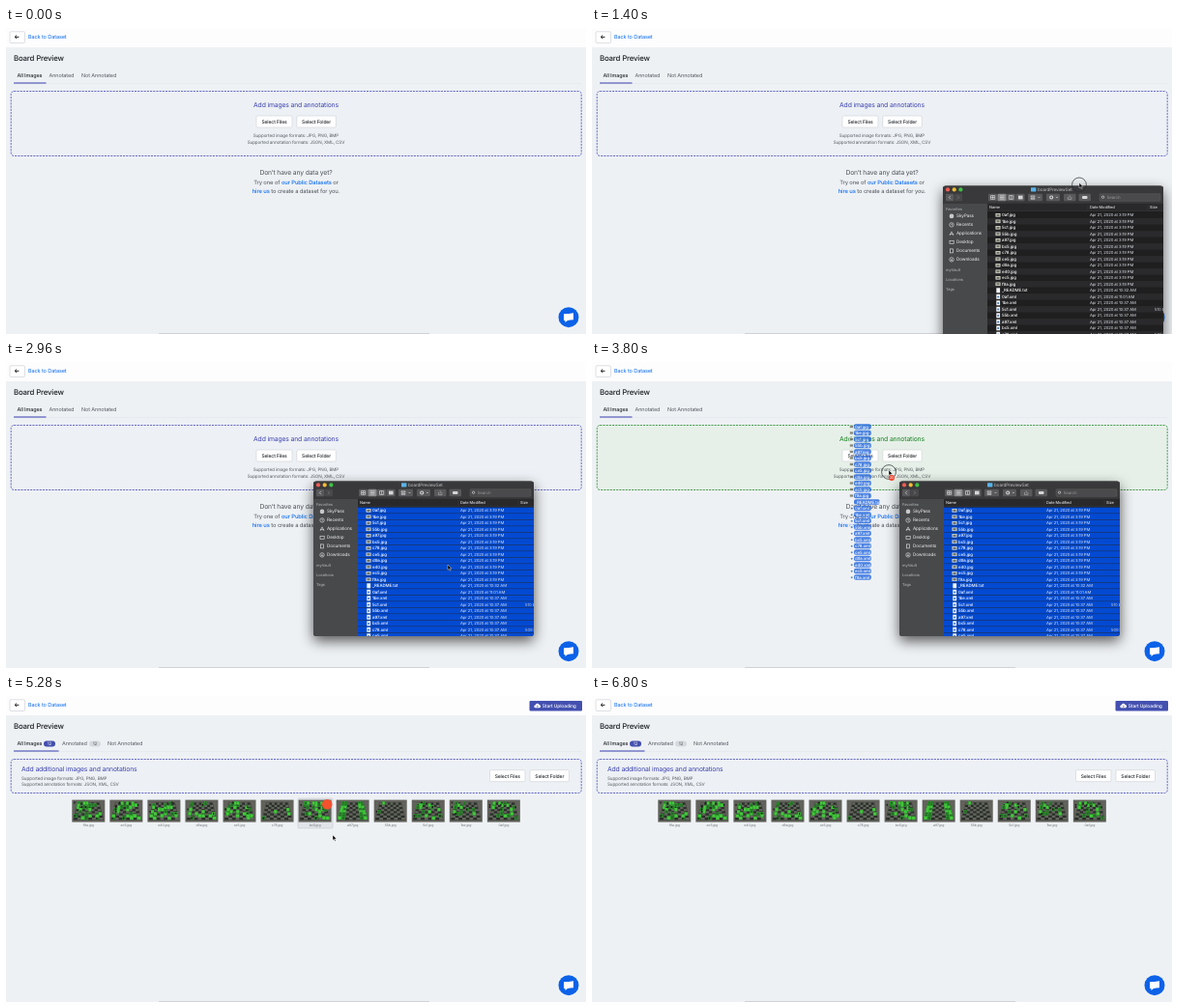
An HTML page that plays this animation: 600 px wide and 317 px high, repeating every 6840 ms.

```html
<!DOCTYPE html>
<html lang="en">
<head>
<meta charset="utf-8">
<title>Dataset upload</title>
<style>
  html, body { margin: 0; width: 100%; height: 100%; overflow: hidden; background: #eef1f4; }
  svg { display: block; width: 100vw; height: 100vh; }
  text { font-family: Inter, "Open Sans", sans-serif; letter-spacing: -.02em; text-rendering: geometricPrecision; white-space: pre; }
  .link { fill: #0b6cf0; font-weight: 500; }
</style>
</head>
<body>
<svg id="stage" viewBox="0 0 600 317"></svg>
<script>
const LOOP = 6840;
const INDIGO = '#3a41b0', GREEN = '#16801f', LINK = '#0b6cf0', GREY = '#555b62';
const stage = document.getElementById('stage');

function el(parent, tag, attrs = {}, content) {
  const node = document.createElementNS('http://www.w3.org/2000/svg', tag);
  for (const key in attrs) node.setAttribute(key, attrs[key]);
  if (content !== undefined) node.textContent = content;
  parent.append(node);
  return node;
}
const group = (parent, attrs) => el(parent, 'g', attrs);
const rect = (parent, x, y, width, height, fill, more) =>
  el(parent, 'rect', { x, y, width, height, fill, ...more });
const circle = (parent, cx, cy, r, fill, more) => el(parent, 'circle', { cx, cy, r, fill, ...more });
const path = (parent, d, more) => el(parent, 'path', { d, fill: 'none', ...more });
const text = (parent, x, y, size, fill, content, more) =>
  el(parent, 'text', { x, y, 'font-size': size, fill, ...more }, content);
const MID = { 'text-anchor': 'middle' };
const show = (node, on) => node.setAttribute('display', on ? 'inline' : 'none');
const move = (node, [x, y]) => node.setAttribute('transform', `translate(${x} ${y})`);

// Seeded random numbers in 0..1
function seeded(seed) {
  return () => (seed = (seed * 16807) % 2147483647) / 2147483647;
}

// Eased position from steps of [time, x, y]
function along(steps, t) {
  if (t <= steps[0][0]) return steps[0].slice(1);
  for (let i = 1; i < steps.length; i++) {
    const [t1, x1, y1] = steps[i], [t0, x0, y0] = steps[i - 1];
    if (t < t1) {
      const p = (t - t0) / (t1 - t0), k = p * p * (3 - 2 * p);
      return [x0 + (x1 - x0) * k, y0 + (y1 - y0) * k];
    }
  }
  return steps[steps.length - 1].slice(1);
}

const IDS = ['0af', '1be', '5c1', '55b', 'a97', 'bc5', 'c78', 'ce5', 'd9a', 'e40', 'ec5', 'f9a'];
const FILES = [...IDS.map(id => id + '.jpg'), '_README.txt', ...IDS.map(id => id + '.xml')];
const ROW = 6.5;

// ---------- Page ----------
const defs = el(stage, 'defs');
rect(stage, 0, 0, 600, 317, '#eef1f4');
rect(stage, 0, 0, 600, 20, '#fdfdfe');
rect(stage, 158, 316, 280, 1, '#cfd1d4', { rx: .5 });
rect(stage, 8, 57, 587, .5, '#dfe3e7');

const back = group(stage);
rect(back, 4, 3.8, 15.5, 11.7, '#fff', { rx: 1, stroke: '#d0d3d7', 'stroke-width': .7 });
path(back, 'M13.4 9.3H9.2M11 7.5L9.2 9.3L11 11.1', { stroke: '#111', 'stroke-width': .9 });
text(back, 23, 11.2, 5.55, LINK, 'Back to Dataset');

const busy = group(stage);
text(busy, 5, 11.3, 5, '#3f55c8', 'Processing a97.jpg', { opacity: .85 });
const stripes = el(defs, 'pattern', {
  id: 'stripes', width: 3, height: 5, patternUnits: 'userSpaceOnUse', patternTransform: 'skewX(-35)'
});
rect(stripes, 0, 0, 3, 5, '#62a9b4');
rect(stripes, 0, 0, 1.3, 5, '#83bcc6');
const bar = rect(busy, 235, 7.2, 0, 5.6, 'url(#stripes)', { stroke: '#5b93d6', 'stroke-width': .6 });

text(stage, 8, 34.2, 7.8, '#1b1e22', 'Board Preview', { 'font-weight': 500 });

function button(parent, x, y, w, label) {
  rect(parent, x, y, w, 12, '#fff', { rx: 1, stroke: '#d3d6da', 'stroke-width': .7 });
  text(parent, x + w / 2, y + 7.8, 5, '#202328', label, { ...MID, 'font-weight': 500 });
}
function tabs(parent, annotatedX, notX, lineEnd) {
  text(parent, 11.5, 51.4, 5.45, '#25282d', 'All Images', { 'font-weight': 500 });
  text(parent, annotatedX, 51.4, 5.5, GREY, 'Annotated');
  text(parent, notX, 51.4, 5.5, GREY, 'Not Annotated');
  rect(parent, 8, 56.5, lineEnd - 8, 1, INDIGO);
}
function zone(parent, h) {
  return rect(parent, 5.2, 65.5, 590, h, '#edf0f4', {
    rx: 3, stroke: 'currentColor', 'stroke-width': .75, 'stroke-dasharray': '2.1 1.1'
  });
}
function formats(parent, x, y, gap, more) {
  text(parent, x, y, 4.6, GREY, 'Supported image formats: JPG, PNG, BMP', more);
  text(parent, x, y + gap, 4.6, GREY, 'Supported annotation formats: JSON, XML, CSV', more);
}
function richLine(y, parts) {
  const line = text(empty, 300, y, 5.85, '#4c5259', '', MID);
  for (const [content, cls] of parts) el(line, 'tspan', cls ? { class: cls } : {}, content);
}

// Before files are added
const empty = group(stage, { color: INDIGO });
tabs(empty, 44.5, 78, 41.5);
const dropZone = zone(empty, 67);
text(empty, 300, 82.2, 6.8, 'currentColor', 'Add images and annotations', MID);
button(empty, 259, 91, 37, 'Select Files');
button(empty, 300.8, 91, 40.5, 'Select Folder');
formats(empty, 300, 113.4, 6.5, MID);
text(empty, 300, 151.5, 6.75, '#4c5259', 'Don’t have any data yet?', MID);
richLine(162.3, [['Try one of '], ['our Public Datasets', 'link'], [' or']]);
richLine(170.8, [['hire us', 'link'], [' to create a dataset for you.']]);

// After files are added
const filled = group(stage, { color: INDIGO });
tabs(filled, 58, 105, 54.5);
function badge(x, fill, ink) {
  rect(filled, x, 46.5, 12, 6, fill, { rx: 3 });
  text(filled, x + 6, 51.2, 4.6, ink, '12', MID);
}
badge(39, '#434fae', '#fff');
badge(86, '#d6dade', '#555');
zone(filled, 35);
text(filled, 16, 77.6, 6.8, 'currentColor', 'Add additional images and annotations');
formats(filled, 16, 87, 6.4);
button(filled, 500.5, 76.7, 36.5, 'Select Files');
button(filled, 542, 76.7, 40.5, 'Select Folder');
rect(filled, 541.5, 5, 54.5, 10.6, '#4350b0', { rx: 1 });
path(filled, 'M547.8 12.2a1.5 1.5 0 0 1 0-3a2 2 0 0 1 3.7-.3a1.7 1.7 0 0 1 .5 3.3z', { fill: '#fff' });
path(filled, 'M549.8 12v-2M549 10.7l.8-.8l.8.8', { stroke: '#4350b0', 'stroke-width': .5 });
text(filled, 554.8, 12, 4.9, '#fff', 'Start Uploading', { 'font-weight': 500 });

// Board pictures: perspective squares with green marks
const hover = group(filled);
rect(hover, 302, 106, 36, 31, '#e1e4e8', { rx: 1, stroke: '#c6cacf', 'stroke-width': .6 });
const MARKS = [24, 25, 24, 15, 25, 4, 24, 0, 2, 17, 13, 19];
function boardCell(col, row) {
  const half = 11 + row * .6;
  return [17 + (col - 4) * half / 4, 3 + row * 2.2, half / 4, 2.2];
}
function thumb(index) {
  const g = group(filled, { transform: `translate(${68.3 + 39.05 * index} 107.6)` });
  const random = seeded(97 + index * 131);
  rect(g, 0, 0, 34, 23, '#62625c');
  path(g, 'M5.5 2.5h23l4.5 19h-32z', { fill: '#4b4c46' });
  for (let row = 0; row < 8; row++)
    for (let col = 0; col < 8; col++)
      rect(g, ...boardCell(col, row), (row + col) % 2 ? '#2a2e29' : '#62665d');
  const mark = (col, row) => {
    const [x, y, w] = boardCell(col, row), bright = random();
    rect(g, x, y - 1.2, w * .9, 3.2, bright > .45 ? '#45c83c' : '#256d27',
      { stroke: '#2fae2e', 'stroke-width': .35 });
  };
  if (index === 7)
    for (let row = 0; row < 8; row++) [0, 1, 6, 7].forEach(col => mark(col, row));
  for (let i = 0; i < MARKS[index]; i++) {
    const col = Math.floor(random() * 8), row = Math.floor(random() * 8);
    mark(col, row);
    if (i % 4 === 0) rect(g, col * 3.8 + 2, row * 2.3 + 2, 1.3, 1.8, '#151a15');
  }
  text(g, 17, 27.4, 3.5, '#70757b', IDS[11 - index] + '.jpg', MID);
}
for (let i = 0; i < 12; i++) thumb(i);
const remove = group(filled);
circle(remove, 332.2, 112.3, 5.2, '#f4512f');

// Chat button
const chat = group(stage, { transform: 'translate(582 299.7)' });
circle(chat, 0, 0, 10.5, '#0c62e8');
path(chat, 'M-5 -3.4q5 -.2 10 -1v7q-3.5 .4 -6 .6l-2.6 2v-1.8l-1.4 0z', { fill: '#fff' });

// ---------- File window ----------
const win = group(stage);
const W = 228, H = 160.7;
rect(win, 0, 0, W, H, '#1f1f20', { rx: 3, style: 'filter:drop-shadow(0 5px 7px rgba(0,0,0,.65))' });
const clip = el(defs, 'clipPath', { id: 'frame' });
rect(clip, 0, 0, W, H, '#000', { rx: 3 });
const pane = group(win, { 'clip-path': 'url(#frame)' });
rect(pane, 0, 0, W, 18.5, '#39393b');
rect(pane, 0, 18.5, 46, H, '#48494b');
['#f25b53', '#f2bb35', '#3fc146'].forEach((fill, i) => circle(pane, 5 + i * 6.7, 4, 2.1, fill));
rect(pane, 91, 1.8, 5.4, 4.2, '#58b3e8', { rx: .6 });
text(pane, 98, 5.8, 4.6, '#c4c4c6', 'boardPreviewSet');

const tool = (x, w, fill = '#59595b') => rect(pane, x, 8.3, w, 7.6, fill, { rx: 1 });
const ICON = { stroke: '#d6d6d8', 'stroke-width': .7 };
tool(3, 8.3); tool(11.7, 8.3, '#48484a');
path(pane, 'M8 10.3l-1.7 1.8l1.7 1.8', ICON);
path(pane, 'M15 10.3l1.7 1.8l-1.7 1.8', { ...ICON, opacity: .4 });
for (let i = 0; i < 4; i++) {
  tool(47 + i * 9.5, 9.1, i === 1 ? '#8a8a8c' : undefined);
  const x = 49.5 + i * 9.5;
  if (i === 1) path(pane, `M${x} 10.5h4.4m-4.4 1.6h4.4m-4.4 1.6h4.4`, ICON);
  else if (i === 3) rect(pane, x, 10.2, 4.6, 3.8, '#d6d6d8');
  else path(pane, `M${x} 10.2h4.2v3.8h-4.2zm2.1 0v3.8${i ? '' : 'm-2.1-1.9h4.2'}`, ICON);
}
[[88, 15], [107, 14], [125, 12.5], [140.5, 12.5]].forEach(([x, w]) => tool(x, w));
path(pane, 'M91 10.5h4v1.2h-4zm0 2.4h4v1h-4zM98.5 11.5l1 1l1-1M117 11.5l1 1l1-1', ICON);
circle(pane, 112.2, 12.1, 1.5, 'none', { stroke: '#d6d6d8', 'stroke-width': 1.1 });
path(pane, 'M129.5 11.5v2.7h3.4v-2.7M131.2 13v-3.2', { ...ICON, opacity: .6 });
rect(pane, 144, 10.7, 5.5, 2.8, '#d6d6d8', { rx: 1 });
rect(pane, 162, 8.3, 63, 7.6, '#4a4a4c', { rx: 1, stroke: '#666', 'stroke-width': .4 });
circle(pane, 165.6, 11.8, 1.2, 'none', ICON);
text(pane, 169.5, 13.6, 4.4, '#98989a', 'Search');

const side = (y, label) => text(pane, 3, y, 4, '#a9aaac', label, { 'font-weight': 500 });
side(25.9, 'Favorites');
['SkyPass', 'Recents', 'Applications', 'Desktop', 'Documents', 'Downloads'].forEach((label, i) => {
  const y = 31.5 + i * 9;
  if (i === 0) circle(pane, 9, y, 2.3, '#c9cacc');
  else if (i === 2) path(pane, `M7 ${y + 2}l2-4l2 4M7 ${y + .7}h4`, ICON);
  else if (i === 3) rect(pane, 7, y - 1.6, 4.2, 3, 'none', ICON);
  else if (i === 4) rect(pane, 7.4, y - 2, 3.2, 4, 'none', ICON);
  else {
    circle(pane, 9, y, 2.2, 'none', ICON);
    path(pane, i === 1 ? `M9 ${y - 1.2}v1.3h1` : `M9 ${y - 1}v2m-.8-.7l.8.8l.8-.8`, ICON);
  }
  text(pane, 14, y + 1.6, 4.65, '#f0f0f2', label);
});
side(89, 'myVault'); side(99, 'Locations'); side(109, 'Tags');

function fileIcon(parent, x, y, name) {
  if (name.endsWith('jpg')) {
    rect(parent, x, y - 1.8, 5, 3.6, '#e4e2da');
    rect(parent, x + .9, y - 1.1, 3.2, 2.2, '#6c7160');
  } else {
    rect(parent, x + .8, y - 2.5, 3.8, 5, '#f4f4f4');
    if (name.endsWith('xml')) circle(parent, x + 2.7, y + .3, 1, '#3b6fb8');
  }
}
function stamp(i) {
  if (i < 12) return '3:19 PM';
  return i === 12 ? '10:32 AM' : i === 13 ? '11:01 AM' : '10:37 AM';
}
rect(pane, 46, 18.5, W, 7.5, '#29292b');
[['Name', 48], ['Date Modified', 152], ['Size', 214]].forEach(([label, x]) =>
  text(pane, x, 24, 4, '#dcdcde', label, { 'font-weight': 500 }));
path(pane, 'M150 19.5v5.5M212 19.5v5.5M46 26h182', { stroke: '#47474a', 'stroke-width': .4 });
for (let i = 1; i < 21; i += 2) rect(pane, 46, 27.2 + i * ROW, W, ROW, '#2a2a2c');
const selection = group(pane);
for (let i = 0; i < 21; i++) rect(selection, 46, 27.2 + i * ROW, W, ROW - .4, '#034ad2');
FILES.slice(0, 21).forEach((name, i) => {
  const y = 30.4 + i * ROW;
  fileIcon(pane, 54.5, y, name);
  text(pane, 61, y + 1.5, 4.4, '#fff', name, { 'font-weight': 500 });
  text(pane, 152, y + 1.5, 4.2, '#dfe2e8', 'Apr 21, 2020 at ' + stamp(i));
  if (i === 15 || i === 19) text(pane, 219, y + 1.5, 4.2, '#c4c8d0', i === 15 ? '510 b' : '509 b');
});

// ---------- Dragged files and pointer ----------
const stack = group(stage, { opacity: .82 });
FILES.forEach((name, i) => {
  const y = -47 + i * ROW;
  fileIcon(stack, -41, y, name);
  rect(stack, -36, y - 2.8, name.length * 2.25 + 2, 5.6, '#2468e0', { rx: 2 });
  text(stack, -35, y + 1.5, 4.4, '#fff', name, { 'font-weight': 500 });
});

const pointer = group(stage);
const press = circle(pointer, 0, 0, 7.4, 'none', { stroke: '#2a2d31', 'stroke-width': .7 });
const arrow = path(pointer, 'M0 -2v5.4l1.3-1.1l.9 2l.9-.4l-.9-2h1.7z',
  { fill: '#000', stroke: '#fff', 'stroke-width': .4 });
const beam = path(pointer, 'M-1.4 -2.8q1.4 0 1.4 1q0 -1 1.4 -1M0 -2v4.5M-1.4 3q1.4 0 1.4 -1q0 1 1.4 1',
  { stroke: '#111', 'stroke-width': .8 });
const count = group(pointer);
circle(count, 3, 6, 3, '#f0442e');
text(count, 3, 7.4, 3.6, '#fff', '25', MID);

// ---------- Motion ----------
const WINDOW_PATH = [[760, 566, 312], [1400, 363, 163.4], [1840, 318, 123.4]];
const POINTER_PATH = [
  [1840, 459, 125], [2160, 459, 125], [2600, 457, 212], [2960, 457, 212],
  [3120, 414, 200], [3640, 309, 112], [3800, 307, 114], [4200, 323, 118],
  [4800, 323, 118], [5280, 338, 146], [5800, 352, 176]
];
const within = (t, from, to) => t >= from && t < to;

function draw(t) {
  const carrying = within(t, 1000, 1840), dragging = within(t, 3120, 4240);
  const processing = within(t, 4320, 4720), done = t >= 4720;
  const overZone = within(t, 3480, 4240);

  const at = along(WINDOW_PATH, t);
  show(win, within(t, 760, 4240));
  move(win, at);
  show(selection, t >= 2680);

  const tip = t < 1840 ? [at[0] + 141, at[1] - 1] : along(POINTER_PATH, t);
  show(pointer, within(t, 760, 5840));
  move(pointer, tip);
  show(press, carrying || dragging);
  show(arrow, !processing);
  show(beam, processing);
  show(count, dragging);
  show(stack, dragging);
  move(stack, tip);

  empty.setAttribute('color', overZone ? GREEN : INDIGO);
  dropZone.setAttribute('fill', overZone ? '#e6f0e8' : '#edf0f4');
  show(empty, !done);
  show(filled, done);
  show(hover, t < 5320);
  show(remove, t < 5320);

  back.setAttribute('opacity', processing ? .5 : 1);
  show(busy, processing);
  bar.setAttribute('width', 130 * Math.min(1, Math.max(0, (t - 4320) / 260)));
}

const start = performance.now();
function tick() {
  draw((performance.now() - start) % LOOP);
  requestAnimationFrame(tick);
}
tick();
</script>
</body>
</html>
```
